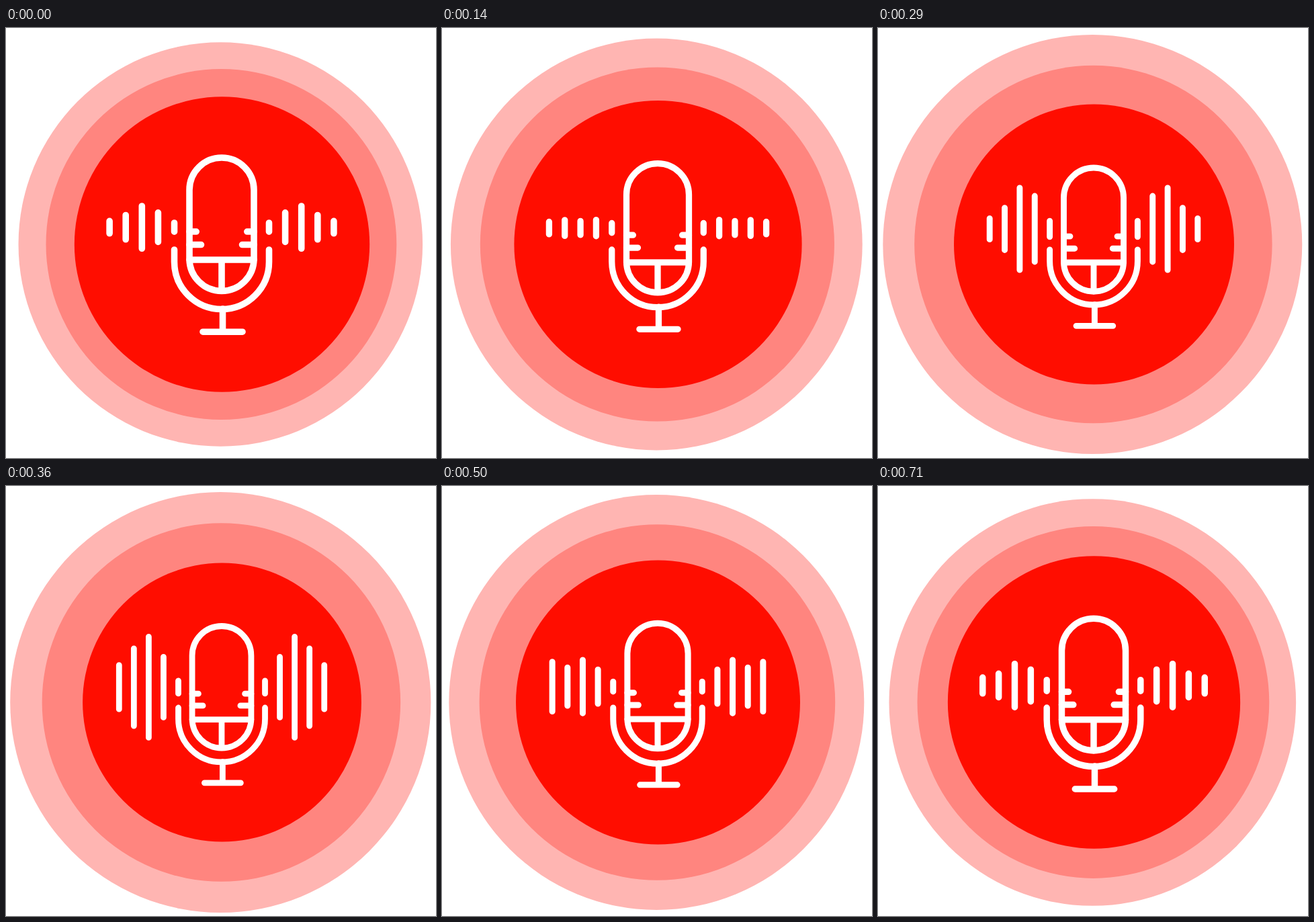
Animation of 640 by 640 pixels, one loop 780 ms. Source, as an HTML page:

```html
<!DOCTYPE html>
<html lang="en">
<head>
<meta charset="utf-8">
<title>Microphone pulse</title>
<style>
  html, body { margin: 0; width: 100%; height: 100%; overflow: hidden; background: #fff; }
  svg { display: block; width: 100vw; height: 100vh; }
</style>
</head>
<body>
<svg viewBox="0 0 640 640">
  <circle id="outer" cx="319.3" cy="322" fill="#ffb5b2"/>
  <circle id="middle" cx="320.4" cy="322" fill="#ff857f"/>
  <circle id="inner" cx="321.5" cy="322" fill="#ff0d00"/>
  <g fill="none" stroke="#fff" stroke-width="9.6" stroke-linecap="round">
    <g id="stand">
      <path d="M-70.5 0V18A70.5 70.5 0 0 0 70.5 18V0"/>
      <path d="M1.5 88V122.2M-28 122.2H31"/>
      <path id="bars"/>
    </g>
    <g id="body">
      <rect x="-48" y="-137" width="96" height="198.5" rx="48"/>
      <path d="M-48 15H48M0 15V61M-48 -27H-37.8M-48 -7.5H-30.5M48 -27H37.8M48 -7.5H30.5"/>
    </g>
  </g>
</svg>
<script>
const LOOP = 780, STEPS = 11;
const el = id => document.getElementById(id);
const set = (id, name, value) => el(id).setAttribute(name, value);

// Steps last 70 ms, except the fourth at 80 ms.
const stepAt = ms => ms < 290 ? Math.min(3, Math.floor(ms / 70)) : Math.floor((ms - 10) / 70);

// Rises from 0 to 1 at the peak, then falls back by the end of the loop.
const ramp = (t, peak) => t < peak ? t / peak : (STEPS - t) / (STEPS - peak);
const soften = u => (u + Math.sin(u * Math.PI / 2) ** 2) / 2;
const bell = x => Math.exp(-x * x);

// A sound wave runs outwards through the bars, listed from the microphone out:
// half height at rest, swell, dip before the swell, dip after it.
const bars = [
  { rest: 13, swell: 3.5, before: 4, after: 2 },
  { rest: 28.5, swell: 26, before: 16, after: 0 },
  { rest: 37, swell: 43, before: 26, after: 0 },
  { rest: 23, swell: 43, before: 13, after: 13 },
  { rest: 14, swell: 36, before: 1, after: -11 }
];

function barHeight(bar, i, t) {
  const x = t - 3.65 - 0.6 * i;
  return bar.rest + bar.swell * bell(x / 1.6)
    - bar.before * bell((x + 2.5) / 1.2)
    - bar.after * bell((x - 2.5) / 1.2);
}

function barPath(t, scale) {
  return bars.map((bar, i) => {
    const x = 70.5 + 24.1 * i;
    const half = barHeight(bar, i, t) / scale - 4.8;
    return [-x, x].map(px => `M${px} ${-33.4 - half}v${2 * half}`).join("");
  }).join("");
}

function draw(ms) {
  const t = stepAt(ms % LOOP);
  const pulse = ramp(t, 4.65);
  const scale = 1 - 0.085 * soften(ramp(t, 5));
  const drop = 3 * Math.min(1, t / 2) + 2.6 * bell((t - 3.3) / 1.6);
  set("outer", "r", 300.8 + 13 * pulse);
  set("middle", "r", 260.9 + 6.2 * pulse);
  set("inner", "r", 219.7 - 13 * pulse);
  set("stand", "transform", `translate(321 330) scale(${scale})`);
  set("body", "transform", `translate(321 ${330 + drop}) scale(${scale})`);
  set("bars", "d", barPath(t, scale));
}

const start = performance.now();
function tick() {
  draw(performance.now() - start);
  requestAnimationFrame(tick);
}
tick();
</script>
</body>
</html>
```
